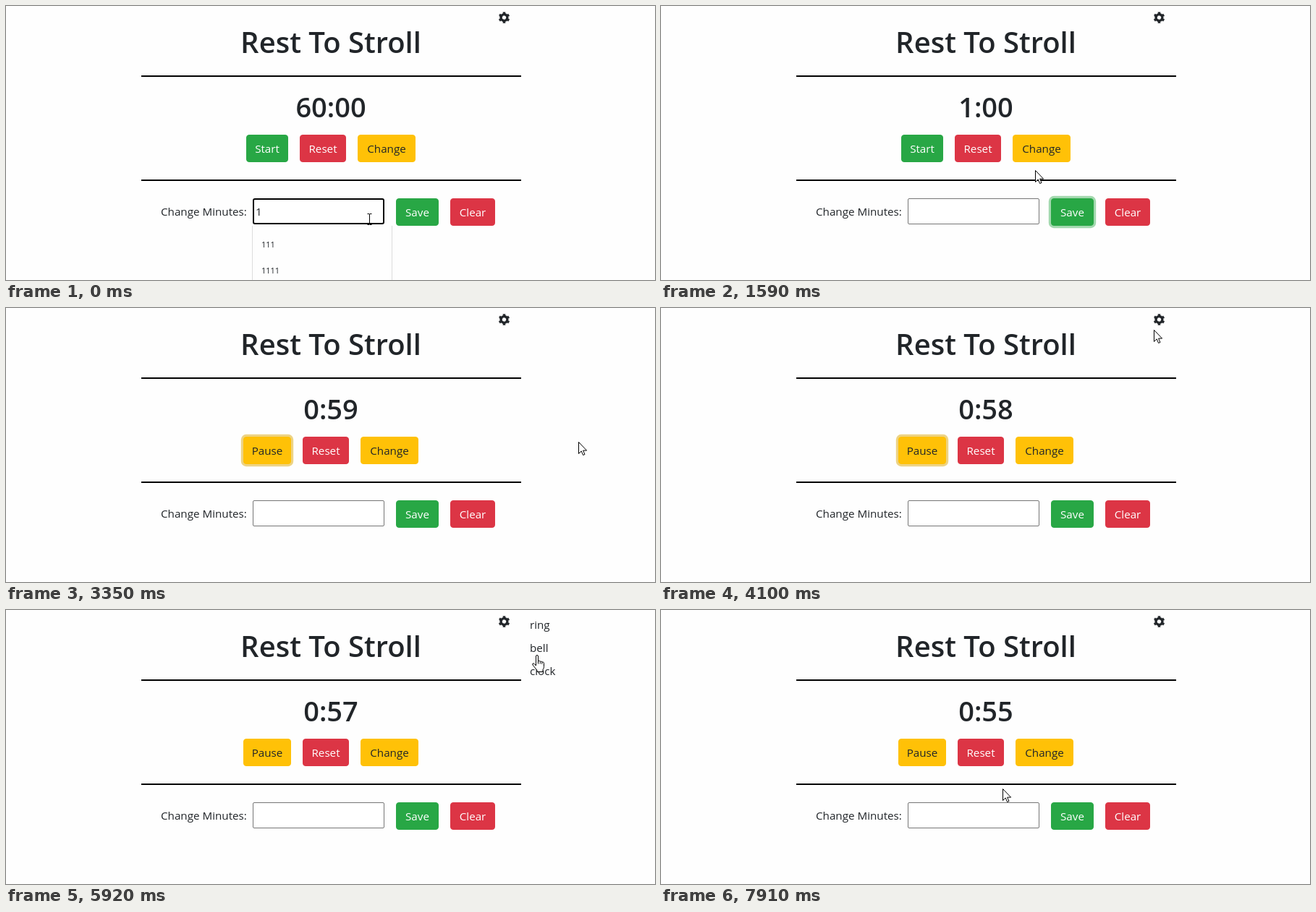
Write an HTML page that moves like this. It is 897 px wide and 379 px high and loops after 8 s.

```html
<!DOCTYPE html>
<html lang="en">
<head>
<meta charset="utf-8">
<title>Stand-up timer</title>
<style>
html, body { margin: 0; width: 100%; height: 100%; overflow: hidden; background: #fefefe; }
svg { display: block; font: 15.2px "Open Sans", "Noto Sans", sans-serif; fill: #212529; }
.big { font-size: 40px; font-weight: 600; }
#timer { font-size: 38px; }
.mid { text-anchor: middle; }
.cursor path { fill: #fff; stroke: #000; stroke-linejoin: round; }
.cursor .line { fill: none; }
</style>
</head>
<body>
<svg width="897" height="379" viewBox="0 0 897 379">
  <text class="big mid" x="449" y="64.5">Rest To Stroll</text>
  <path d="M187 97H712M187 241H712" stroke="#000" stroke-width="2"/>
  <g fill="none" stroke="#212529" transform="translate(688.5 16) rotate(15)">
    <circle r="4.4" stroke-width="3.4"/>
    <circle r="6.6" stroke-width="2.4" pathLength="12" stroke-dasharray="1 1"/>
  </g>
  <text id="timer" class="big mid" x="449" y="154"></text>
  <g id="buttons"></g>
  <text x="214" y="289.5">Change Minutes:</text>
  <rect id="field" fill="#fff"/>
  <g id="suggestions">
    <text x="345" y="290">1</text>
    <path d="M340.5 304V379M533.5 304V379" stroke="#ddd"/>
    <g font-size="11"><text x="353" y="334">111</text><text x="353" y="370">1111</text></g>
  </g>
  <g id="menu">
    <text x="724" y="25.5">ring</text><text x="724" y="57.5">bell</text><text x="724" y="89.5">clock</text>
  </g>
  <g id="arrow" class="cursor"><path d="M.5.5v16l3.7-3.6 2.4 5.6 2.4-1-2.4-5.4h5z"/></g>
  <g id="hand" class="cursor"><g transform="translate(-7)">
    <path d="M5.5 15V2a1.5 1.5 0 0 1 3 0v6.5q2-1 2.7.7q2-.8 2.6.8q2.5-.6 2.7 1.5v5q0 2-1.5 4v3h-8v-2L1 14q-1-2 1-2.2q1 0 3.5 3.2z"/>
    <path class="line" d="M8.5 8.5v4M11.2 9.5v3M13.8 10.3v2.5"/>
  </g></g>
  <g id="beam" class="cursor"><path class="line" transform="translate(-3 -7)" d="M.5.5H3l.5.5.5-.5h2.5M3.5 1v14M.5 15.5H3l.5-.5.5.5h2.5"/></g>
</svg>
<script>
const LOOP = 8000, TICK = LOOP / 60;
const SAVE = 790, START = 2200, OPEN = 5150, CLOSE = 6440;   // click times

const green = { fill: '#28a745', dark: '#218838', ring: '#48b461', ink: '#fff' };
const red = { fill: '#dc3545', ink: '#fff' };
const yellow = { fill: '#ffc107', ink: '#212529' };
const pauseYellow = { ...yellow, dark: '#e0a800', edge: '#d39e00', ring: '#deaa0c' };

// Pointer journeys: start and end time, then where it arrives
const moves = [
  [270, 660, 585, 284],    // to Save
  [1360, 1590, 517, 227],
  [1600, 2130, 380, 197],  // to Start
  [2480, 2980, 806, 186],
  [2980, 3330, 791, 185],
  [3470, 4220, 671, 15],
  [4220, 4490, 690, 15],   // to the gear
  [5440, 5860, 734, 62],   // down the menu
  [5920, 6160, 740, 80],
  [6700, 6980, 694, 199],
  [6980, 7860, 472, 247]
];

const $ = id => document.getElementById(id);
const set = (node, attrs) => { for (const k in attrs) node.setAttribute(k, attrs[k]); };
const show = (id, on) => set($(id), { visibility: on ? 'visible' : 'hidden' });
const clamp = v => Math.max(0, Math.min(1, v));
const inside = (p, b) => p.x >= b.x && p.x <= b.x + b.w && p.y >= b.y && p.y <= b.y + b.h;

const field = { x: 341, y: 266, w: 182, h: 36 };
const gear = { x: 681, y: 8, w: 16, h: 16 };
const menu = { x: 724, y: 4, w: 37, h: 96 };

// The screen is sampled in ticks, so the pointer advances in small jumps
function pointer(t) {
  const sampled = Math.floor((t + 20) / TICK) * TICK;
  let x = 502, y = 294;
  for (const [start, end, toX, toY] of moves) {
    const ease = 1 - (1 - clamp((sampled - start) / (end - start))) ** 2;
    x += (toX - x) * ease;
    y += (toY - y) * ease;
  }
  return { x: Math.round(x), y: Math.round(y) };
}

// Lays buttons left to right with a fixed gap
function row(x, y, items) {
  return items.map(([label, w, look, glow = 0]) => {
    const box = { label, x, y, w, h: 38, look, glow };
    x += w + 16;
    return box;
  });
}

function layout(t) {
  const first = t < START
    ? ['Start', 58, green]
    : ['Pause', 66, pauseYellow, clamp((OPEN - t) / 200)];
  const left = 449 - (first[1] + 64 + 80 + 32) / 2;
  return [
    ...row(left, 178, [first, ['Reset', 64, red], ['Change', 80, yellow]]),
    ...row(539, 266, [['Save', 59, green, +(t >= SAVE && t < START)], ['Clear', 62, red]])
  ];
}

function buttonMarkup({ label, x, y, w, h, look, glow }, hovered) {
  const fill = hovered && look.dark || look.fill;
  const edge = hovered && look.edge || fill;
  const ring = glow && `<rect x="${x - 3.2}" y="${y - 3.2}" width="${w + 6.4}" height="${h + 6.4}" rx="7.2" fill="${look.ring}" opacity="${glow / 2}"/>`;
  return `${ring || ''}<rect x="${x + .5}" y="${y + .5}" width="${w - 1}" height="${h - 1}" rx="3.5" fill="${fill}" stroke="${edge}"/>
    <text class="mid" x="${x + w / 2}" y="${y + 24.5}" fill="${look.ink}">${label}</text>`;
}

function clock(t) {
  const elapsed = Math.max(0, Math.floor((t - 1945) / 1035));
  return t < SAVE ? '60:00' : elapsed ? '0:' + (60 - elapsed) : '1:00';
}

let drawn = '';
function render(now) {
  const t = now % LOOP, editing = t < SAVE, menuOpen = t >= OPEN && t < CLOSE;
  const p = pointer(t), buttons = layout(t);

  const html = buttons.map(b => buttonMarkup(b, inside(p, b))).join('');
  if (html !== drawn) $('buttons').innerHTML = drawn = html;
  $('timer').textContent = clock(t);
  set($('field'), editing
    ? { x: 342, y: 267, width: 180, height: 34, rx: 2, stroke: '#000', 'stroke-width': 2 }
    : { x: 341.5, y: 266.5, width: 181, height: 35, rx: 1.5, stroke: '#767676', 'stroke-width': 1 });
  show('suggestions', editing);
  show('menu', menuOpen);

  const links = [...buttons, gear, ...(menuOpen ? [menu] : [])];
  const shape = inside(p, field) ? 'beam' : links.some(b => inside(p, b)) ? 'hand' : 'arrow';
  for (const id of ['arrow', 'hand', 'beam']) show(id, id === shape);
  set($(shape), { transform: `translate(${p.x} ${p.y})` });
  requestAnimationFrame(render);
}
render(0);
</script>
</body>
</html>
```
